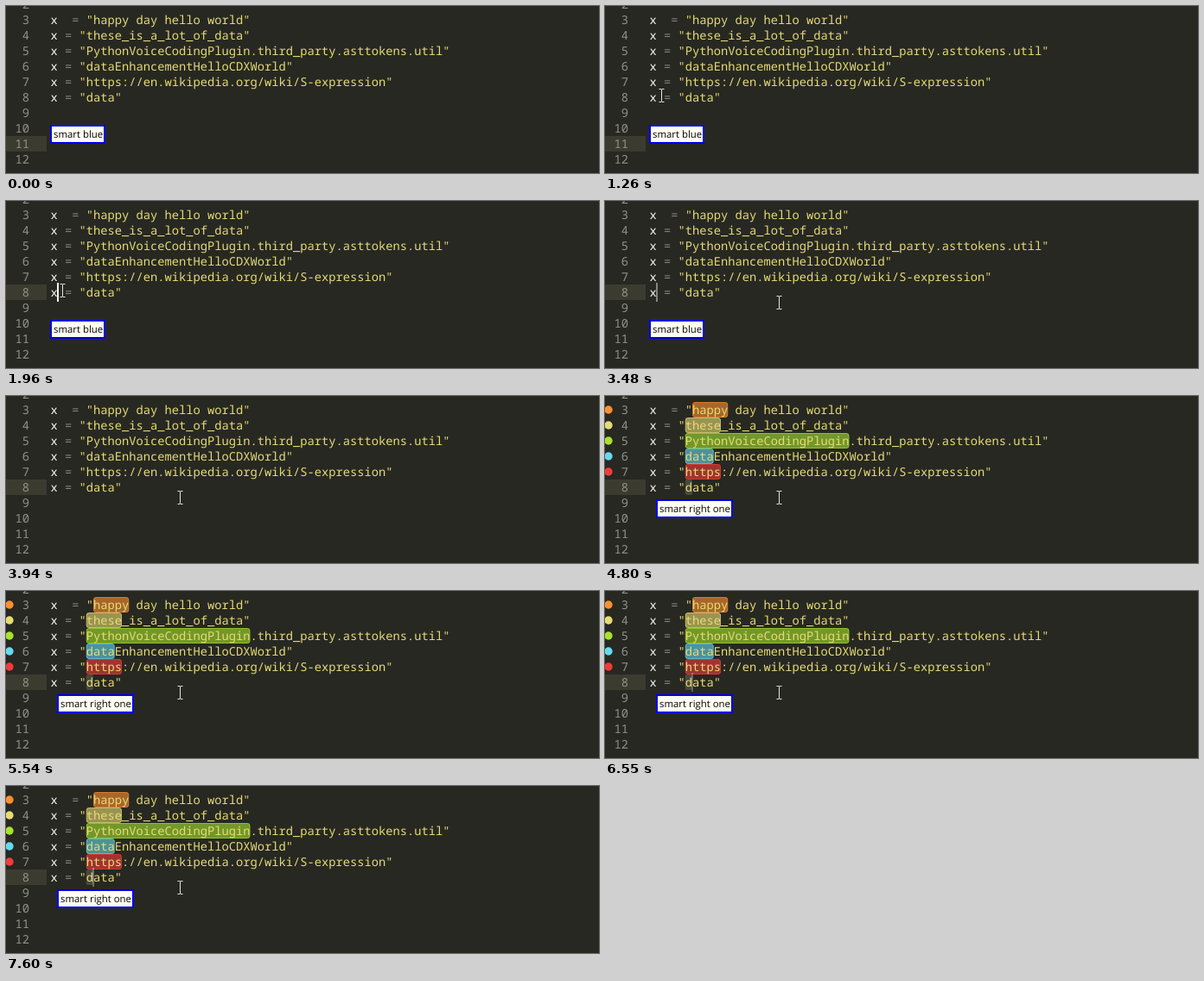
An HTML page that plays this animation: 686 px wide and 194 px high, repeating every 8 s.

```html
<!DOCTYPE html>
<html lang="en">
<head>
<meta charset="utf-8">
<title>Voice coding in an editor</title>
<style>
html, body { margin: 0; width: 100%; height: 100%; overflow: hidden; background: #272822; }
svg { display: block; width: 686px; height: 194px; }
text { white-space: pre; text-rendering: geometricPrecision; }
.code { font: 13.75px "Noto Sans Mono", monospace; fill: #e6db74; }
.num { fill: #90918b; text-anchor: end; }
.name { fill: #f8f8f2; }
.op { fill: #85807c; }
.tip rect { fill: #fffff4; stroke: #0000f0; stroke-width: 2; }
.tip text { font: 11.4px "Open Sans", sans-serif; fill: #000; }
</style>
</head>
<body>
<svg id="stage" viewBox="0 0 686 194"></svg>
<script>
const LOOP = 8000, LEFT = 51.5, CHAR = 8.25, ROW = 18;
const PLACED = 1960, MARKED = 4800, SELECTED = 4990;
const stage = document.getElementById('stage');
const rowTop = n => n * ROW - 47;
const baseline = n => rowTop(n) + 14;

function add(tag, attrs, parent = stage, text = '') {
  const el = document.createElementNS('http://www.w3.org/2000/svg', tag);
  for (const key in attrs) el.setAttribute(key, attrs[key]);
  el.textContent = text;
  return parent.appendChild(el);
}

const show = (el, on) => el.setAttribute('visibility', on ? 'visible' : 'hidden');
const ramp = (t, from, to) => Math.min(1, Math.max(0, (t - from) / (to - from)));

const band = add('rect', { width: 47, height: ROW, fill: '#3c3b30' });
const marks = add('g');

for (let n = 2; n <= 12; n++) add('text', { class: 'code num', x: 27, y: baseline(n) }, stage, n);

// Code rows: left side, marked word, rest of the string, mark colour
[
  ['x  ', 'happy', ' day hello world', '#fd8f2f'],
  ['x ', 'these', '_is_a_lot_of_data', '#e6db74'],
  ['x ', 'PythonVoiceCodingPlugin', '.third_party.asttokens.util', '#a6e22e'],
  ['x ', 'data', 'EnhancementHelloCDXWorld', '#66d9ef'],
  ['x ', 'https', '://en.wikipedia.org/wiki/S-expression', '#f03c3a'],
  ['x ', 'd', 'ata']
].forEach(([name, word, rest, color], i) => {
  const y = rowTop(i + 3), x = LEFT + (name.length + 3) * CHAR, width = word.length * CHAR;
  if (color) {
    add('circle', { cx: 4, cy: y + 9, r: 4.7, fill: color }, marks);
    add('rect', {
      x: x + .5, y: y + .5, width: width - 1, height: ROW - 1, rx: 2.5,
      fill: color, 'fill-opacity': .6, stroke: color, 'stroke-opacity': .75
    }, marks);
  } else {
    add('rect', { x, y, width, height: ROW, rx: 2, fill: '#49483e' }, marks);
  }
  const line = add('text', { class: 'code', x: LEFT, y: baseline(i + 3) });
  add('tspan', { class: 'name' }, line, name);
  add('tspan', { class: 'op' }, line, '= ');
  add('tspan', {}, line, `"${word}${rest}"`);
});

const caret = add('rect', { y: rowTop(8) - 2, width: 2, height: 22, fill: '#f8f8f0' });

function tip(x, y, width, height, label) {
  const g = add('g', { class: 'tip' });
  add('rect', { x: x + 1, y: y + 1, width: width - 2, height: height - 2 }, g);
  add('text', { x: x + 4, y: y + 15 }, g, label);
  return g;
}
const tips = [
  [tip(51, 138, 64, 22, 'smart blue'), 0, 3550],
  [tip(59, 120, 64, 22, 'smart blue'), 3550, 3940],
  [tip(59, 120, 16, 16, ''), 4350, 4500],
  [tip(59, 120, 89, 22, 'smart right one'), 4500, LOOP]
];

const click = add('circle', { cx: 63, cy: 103, r: 12, fill: '#ff0', 'fill-opacity': .47 });
const mouse = add('path', {
  d: 'M-3 -7.5h2.5l.5 .5 .5 -.5h2.5M0 -7V7M-3 7.5h2.5l.5 -.5 .5 .5h2.5',
  fill: 'none', stroke: '#e4e4e0'
});

// Mouse moves: start, end, destination
const moves = [
  [180, 330, 154.5, 107.5],
  [405, 780, 67.5, 102],
  [1110, 1230, 65.5, 104],
  [2340, 2490, 201.5, 118]
];

// The pointer is sampled every 75 ms.
function mouseAt(t) {
  const tick = Math.floor((t - 30) / 75) * 75 + 30;
  let x = 229.5, y = 120;
  for (const [from, to, toX, toY] of moves) {
    const k = ramp(tick, from, to), eased = k * k * (3 - 2 * k);
    x += (toX - x) * eased;
    y += (toY - y) * eased;
  }
  return [x, y];
}

// Blinks every 1065 ms with soft edges; starts afresh when the caret moves.
function caretOpacity(t) {
  if (t < PLACED) return 0;
  const age = t - (t < SELECTED ? PLACED : SELECTED), phase = age % 1065;
  const fadeIn = age < 1065 ? 1 : ramp(phase, -60, 100);
  return fadeIn * (1 - ramp(phase, 340, 550));
}

function draw() {
  const t = performance.now() % LOOP, marked = t >= MARKED;
  band.setAttribute('y', rowTop(t < PLACED ? 11 : 8));
  show(marks, marked);
  caret.setAttribute('x', marked ? 100 : 59);
  caret.setAttribute('opacity', caretOpacity(t));
  for (const [el, from, to] of tips) show(el, t >= from && t < to);
  show(click, t >= 1640 && t < 1900);
  show(mouse, t >= 180);
  mouse.setAttribute('transform', `translate(${mouseAt(t)})`);
  requestAnimationFrame(draw);
}
draw();
</script>
</body>
</html>
```
